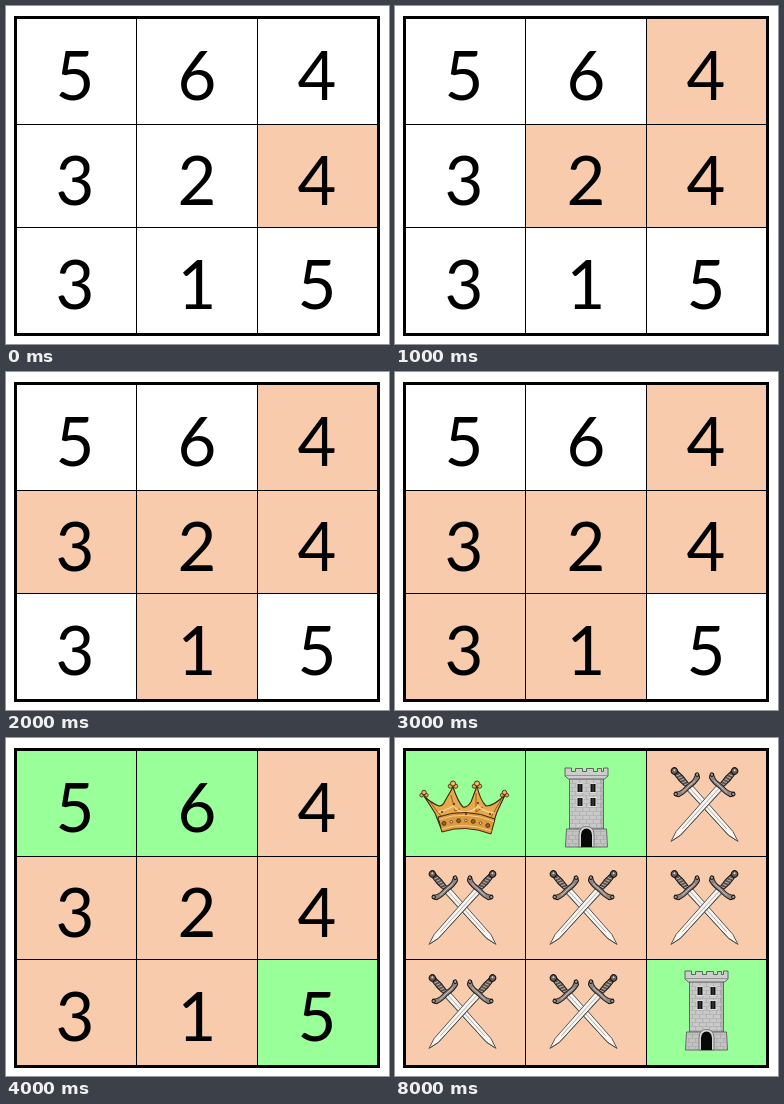
An HTML page with a canvas that plays this animation: 383x338 px, repeating every 10 s.

```html
<!DOCTYPE html>
<html lang="en">
<head>
<meta charset="utf-8">
<title>Grid</title>
<style>
  html, body { margin: 0; width: 100%; height: 100%; overflow: hidden; background: #fff; }
  canvas { display: block; width: 383px; height: 338px; }
</style>
</head>
<body>
<canvas id="stage" width="383" height="338"></canvas>
<script>
const ctx = document.getElementById('stage').getContext('2d');
const LOOP = 10000, STEP = 1000, LAST = 5;
const PEACH = '#f8cbad', GREEN = '#99ff99', INK = '#1a1716';

// Cell edges: start and end of each column and row
const cols = [[11, 130], [131, 251], [252, 371]];
const rows = [[13, 118], [119, 221], [222, 327]];
const digitX = [69, 191, 311];
const baseline = [94, 199, 303];

// Each cell: digit, step at which it is coloured, final picture
const cells = [
  [[5, 4, 'crown'], [6, 4, 'tower'], [4, 1, 'swords']],
  [[3, 2, 'swords'], [2, 1, 'swords'], [4, 0, 'swords']],
  [[3, 3, 'swords'], [1, 2, 'swords'], [5, 4, 'tower']]
];

function box(x, y, w, h, color) {
  ctx.fillStyle = color;
  ctx.fillRect(x, y, w, h);
}

function shape(d, fill, stroke, width = 1) {
  const p = new Path2D(d);
  if (fill) { ctx.fillStyle = fill; ctx.fill(p); }
  if (stroke) { ctx.strokeStyle = stroke; ctx.lineWidth = width; ctx.stroke(p); }
}

function dot(x, y, r, fill, stroke, width = 1) {
  ctx.beginPath();
  ctx.arc(x, y, r, 0, Math.PI * 2);
  ctx.fillStyle = fill;
  ctx.fill();
  if (stroke) { ctx.strokeStyle = stroke; ctx.lineWidth = width; ctx.stroke(); }
}

function at(x, y, draw) {
  ctx.save();
  ctx.translate(x, y);
  draw();
  ctx.restore();
}

// Pommel at the origin, blade along the x axis
function sword() {
  shape('M23-3.6L86-2.9L97 0L86 2.9L23 3.6Z', '#f7f5f2', '#55504c', 0.9);
  shape('M25 0H80', null, '#a9a5a1', 0.8);
  shape('M25 3H86L95 0.6', null, '#4a4542', 0.7);
  shape('M5-2.4Q12-3.6 20-2.4V2.4Q12 3.6 5 2.4Z', '#5b5451', INK, 1);
  for (let x = 7; x < 20; x += 3) shape(`M${x} 2L${x + 1.5}-2`, null, '#c9c2bc', 0.8);
  dot(2, 0, 3.2, '#68605c', INK, 1.1);
  dot(1.5, -0.5, 1, '#d8d0ca');
  shape('M21-2.5Q22-10 18-14Q21-17 24-14Q26-8 25 0Q26 8 24 14Q21 17 18 14Q22 10 21 2.5Z',
    '#8c8480', INK, 1);
  dot(20, -14.5, 1.7, '#a59d98', INK, 1);
  dot(20, 14.5, 1.7, '#a59d98', INK, 1);
  shape('M23-9V9', null, '#ddd6d0', 0.7);
}

// Origin at the top middle
function swords() {
  for (const side of [1, -1]) {
    ctx.save();
    ctx.scale(side, 1);
    ctx.translate(-31.5, 3.5);
    ctx.rotate(Math.atan2(73, 66));
    sword();
    ctx.restore();
  }
}

function tower() {
  const line = '#858585';
  shape('M-17 10H17V61H-17Z', '#c9c9c9', '#5c5c5c', 0.9);
  shape('M-20 61H20L21 79H-21Z', '#c3c3c3', '#5c5c5c', 0.9);
  for (let r = 0; r < 17; r++) {
    const y = 11.5 + r * 4, w = y > 61 ? 20 : 16.5;
    box(-w, y, w * 2, 0.5, '#a3a3a3');
    for (let x = -w + 2 + r % 2 * 3.5; x < w - 1; x += 7) box(x, y, 0.6, 4, '#a0a0a0');
  }
  box(14, 11, 2.5, 50, 'rgba(80,80,80,.16)');
  shape('M-21.5 0H-15V3.5H-11V0.5H-4V3.5H0V0.5H7V3.5H11V0.5H15V3.5H17V0H21.5V8L18 11H-18L-21.5 8Z',
    '#cdcdcd', '#555', 0.9);
  shape('M-21 7.5H21', null, line, 0.8);
  for (const y of [16, 30]) {
    for (const x of [-9, 4]) {
      box(x - 0.8, y - 0.8, 6.6, 9.6, '#e5e5e5');
      box(x, y, 5, 8, '#111');
      box(x + 2.2, y, 0.6, 8, '#777');
    }
  }
  shape('M-7.5 79V66Q-7 58.5 0 58.5Q7 58.5 7.5 66V79Z', '#d8d8d8', '#666', 0.8);
  shape('M-5.5 79V67Q-5 60.5 0 60.5Q5 60.5 5.5 67V79Z', '#080808');
}

function crown() {
  const gold = '#e7a94e', dark = '#3c2510';
  // Back rim and inside
  shape('M42 74Q69 65 101 74L98 82Q69 76 45 82Z', '#a96d24', dark, 0.8);
  // Points and body
  shape('M47 93L40 75L29 58Q36 65 44 68Q48 68 50 63L58 49Q63 64 68 69Q72 70 76 64L82 48Q85 62 91 68' +
    'Q99 68 110 57L102 74L95 95Q70 84 47 93Z', gold, dark, 1.1);
  shape('M34 63L46 78M56 57L60 73L65 71M81 55L81 74L88 69M106 62L96 79', null, '#8a5519', 0.9);
  shape('M43 74Q52 72 58 68Q64 75 72 74Q79 73 83 68Q89 74 99 75', null, '#f8d391', 1.4);
  // Band
  shape('M43 79Q71 69 100 81L96 96Q70 86 47 94Z', '#dc9a40', dark, 1);
  shape('M44 81.5Q71 72 99 83.5M46.5 91Q71 83 96.5 93', null, '#f5ce83', 1);
  for (let i = 0; i < 7; i++) {
    const x = 49 + i * 7.3, y = 86.5 - 5 * Math.sin((i + 0.5) / 7 * Math.PI) + i * 0.35;
    dot(x, y, i % 2 ? 1.3 : 2, i % 2 ? '#ffe0a0' : '#9c5f1d', dark, 0.7);
  }
  // Finials
  for (const [x, y, r] of [[29, 56, 2.6], [58, 47, 3], [82, 47, 3], [109.5, 56, 2.6]]) {
    dot(x - r * 0.9, y + 1.2, r * 0.7, gold, dark, 0.8);
    dot(x + r * 0.9, y + 1.2, r * 0.7, gold, dark, 0.8);
    dot(x, y - 1.5, r * 0.85, '#f0bb62', dark, 0.9);
  }
  for (const [x, y] of [[47, 74], [59, 66], [71, 76], [83, 65], [95, 76]]) dot(x, y, 0.9, dark);
}

function picture(kind, c, r) {
  if (kind === 'crown') crown();
  else if (kind === 'tower') at(c ? (c === 1 ? 191.5 : 311.5) : 70, [30, 132, 233][r], tower);
  else at([67.5, 188.5, 309.5][c], [28, 131, 235][r], swords);
}

function grid() {
  ctx.strokeStyle = '#000';
  ctx.lineWidth = 3;
  ctx.strokeRect(9.5, 11.5, 363, 317);
  for (const x of [130, 251]) box(x, 11, 1, 318, '#000');
  for (const y of [118, 221]) box(9, y, 363, 1, '#000');
}

function draw(time) {
  const step = Math.min(LAST, Math.floor(time % LOOP / STEP));
  box(0, 0, 383, 338, '#fff');
  ctx.font = '67px Lato, "Open Sans", sans-serif';
  ctx.textAlign = 'center';
  cells.forEach((line, r) => line.forEach(([digit, from, kind], c) => {
    const [x, right] = cols[c], [y, bottom] = rows[r];
    if (step >= from) box(x, y, right - x, bottom - y, from === 4 ? GREEN : PEACH);
    if (step === LAST) {
      picture(kind, c, r);
    } else {
      ctx.fillStyle = '#000';
      ctx.fillText(digit, digitX[c], baseline[r]);
    }
  }));
  grid();
}

const start = performance.now();
function tick() {
  draw(performance.now() - start);
  requestAnimationFrame(tick);
}
tick();
</script>
</body>
</html>
```
